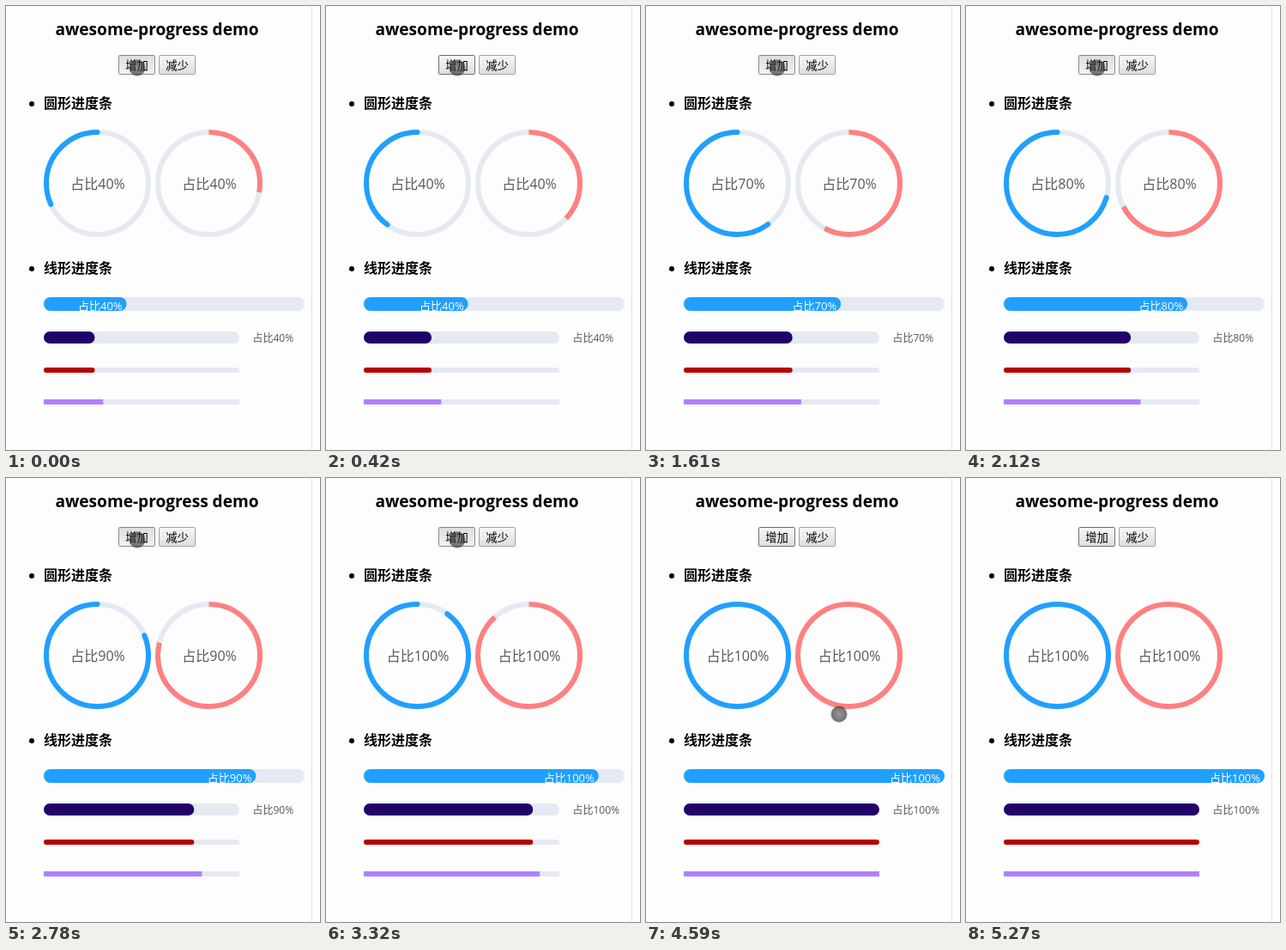
Write an HTML page that moves like this. It is 366 px wide and 517 px high and loops after 6.2 s.

```html
<!DOCTYPE html>
<html lang="zh">
<head>
<meta charset="utf-8">
<title>awesome-progress demo</title>
<style>
  html, body { margin: 0; width: 100%; height: 100%; overflow: hidden; background: #fff; }
  svg { display: block; width: 366px; height: 517px; }
  text { font-family: "Open Sans", "Noto Sans CJK SC", "Noto Sans CJK", sans-serif; }
  .title { font-size: 19.1px; font-weight: 700; text-anchor: middle; }
  .head { font-size: 16px; font-weight: 700; }
  .btn text { font-size: 13.33px; text-anchor: middle; }
  .btn rect { fill: url(#up); stroke: #a3a3a3; }
  .btn.focus rect { stroke: #707070; }
  .btn.down rect { fill: url(#down); stroke: #8c8c8c; }
  .ring path { fill: none; stroke-width: 6; stroke: #e4e9f2; }
  .ring text { font-size: 16px; fill: #55585e; text-anchor: middle; }
  .track { fill: #e4e9f2; }
  #inner { font-size: 13px; fill: #fff; text-anchor: end; }
  #side { font-size: 12px; fill: #55585e; }
</style>
</head>
<body>
<svg viewBox="0 0 366 517">
  <defs>
    <linearGradient id="up" x2="0" y2="1">
      <stop stop-color="#f6f6f6"/><stop offset="1" stop-color="#dddddd"/>
    </linearGradient>
    <linearGradient id="down" x2="0" y2="1">
      <stop stop-color="#dcdcdc"/><stop offset="1" stop-color="#f2f2f2"/>
    </linearGradient>
    <radialGradient id="touch">
      <stop stop-color="#333" stop-opacity=".5"/>
      <stop offset=".85" stop-color="#333" stop-opacity=".68"/>
      <stop offset="1" stop-color="#333" stop-opacity=".4"/>
    </radialGradient>
  </defs>

  <rect width="356" height="517" fill="#fdfdfd"/>
  <rect x="356" width="1" height="517" fill="#e2e2e2"/>

  <text class="title" x="176" y="34">awesome-progress demo</text>

  <g class="btn focus" id="add">
    <rect x="131.5" y="57.5" width="42" height="22" rx="1"/>
    <text x="152.5" y="74">增加</text>
  </g>
  <g class="btn">
    <rect x="178.5" y="57.5" width="42" height="22" rx="1"/>
    <text x="199.5" y="74">减少</text>
  </g>

  <circle cx="30" cy="114" r="3"/>
  <text class="head" x="44" y="119">圆形进度条</text>
  <circle cx="30" cy="306" r="3"/>
  <text class="head" x="44" y="311">线形进度条</text>

  <g class="ring">
    <path d="M106.5 147a59.5 59.5 0 0 0 0 119a59.5 59.5 0 0 0 0-119"/>
    <path id="blueRing" pathLength="100" d="M106.5 147a59.5 59.5 0 0 0 0 119a59.5 59.5 0 0 0 0-119"
      style="stroke:#20a0ff;stroke-linecap:round"/>
    <text class="pct" x="107" y="213"></text>
  </g>
  <g class="ring">
    <path d="M236.5 147a59.5 59.5 0 0 1 0 119a59.5 59.5 0 0 1 0-119"/>
    <path id="pinkRing" pathLength="100" d="M236.5 147a59.5 59.5 0 0 1 0 119a59.5 59.5 0 0 1 0-119"
      style="stroke:#ff8080"/>
    <text class="pct" x="237" y="213"></text>
  </g>

  <rect class="track" x="44" y="339" width="304" height="16" rx="8"/>
  <rect id="blueBar" x="44" y="339" height="16" rx="8" fill="#20a0ff"/>
  <text class="pct" id="inner" y="354"></text>

  <rect class="track" x="44" y="379" width="228" height="14" rx="7"/>
  <rect id="navyBar" x="44" y="379" height="14" rx="7" fill="#22006a"/>
  <text class="pct" id="side" x="287.5" y="391"></text>

  <rect class="track" x="44" y="421" width="228" height="6" rx="3"/>
  <rect id="redBar" x="44" y="421" height="6" rx="3" fill="#b60000"/>

  <rect class="track" x="44" y="458" width="228" height="6"/>
  <rect id="violetBar" x="44" y="458" height="6" fill="#b080ff"/>

  <circle id="cursor" r="9.7" fill="url(#touch)"/>
</svg>
<script>
const LOOP = 6200;
const $ = id => document.getElementById(id);

// Each tap adds 10 percent, starting with 40.
const taps = [-70, 530, 1045, 1590, 2090, 2720, 3315];
// Moments at which the screen refreshes.
const ticks = [0, 150, 270, 420, 540, 660, 780, 900, 1050, 1180, 1330, 1460, 1610, 1730,
  1880, 2000, 2120, 2240, 2390, 2510, 2660, 2780, 2900, 3020, 3170, 3320, 3440, 3590,
  3710, 3860, 3990, 4140, 4290, 4440, 4590, 4720, 4870, 4990, 5140, 5270];
// Pointer path: time, x, y
const path = [[4440, 153, 72], [4590, 225, 275], [4720, 278, 441],
  [4870, 294, 476], [4990, 302, 493], [5140, 309, 510], [5270, 314, 530]];

// cubic-bezier(.25, .1, .25, 1)
function ease(x) {
  if (x >= 1) return 1;
  const curve = (a, b, u) => 3 * a * u * (1 - u) ** 2 + 3 * b * u * u * (1 - u) + u ** 3;
  let lo = 0, hi = 1;
  for (let i = 0; i < 20; i++) {
    const mid = (lo + hi) / 2;
    if (curve(.25, .25, mid) < x) lo = mid; else hi = mid;
  }
  return curve(.1, 1, lo);
}

// Every tap restarts the transition from wherever the value is.
function progress(t, duration, start) {
  let value = start;
  taps.forEach((tap, i) => {
    if (t < tap) return;
    const end = Math.min(t, taps[i + 1] ?? t);
    value += (40 + 10 * i - value) * ease((end - tap) / duration);
  });
  return value;
}

function pointer(t) {
  if (t <= path[0][0]) return path[0].slice(1);
  const i = path.findIndex(p => p[0] >= t);
  if (i < 0) return path[path.length - 1].slice(1);
  const [a, b] = [path[i - 1], path[i]];
  const k = (t - a[0]) / (b[0] - a[0]);
  return [a[1] + (b[1] - a[1]) * k, a[2] + (b[2] - a[2]) * k];
}

const setRing = (id, p) => $(id).setAttribute("stroke-dasharray", p >= 99.95 ? "none" : p + " 200");
const setBar = (id, p, full) => $(id).setAttribute("width", p / 100 * full);
const labels = document.querySelectorAll(".pct");

function draw(t) {
  const done = taps.filter(tap => tap <= t);
  const blue = progress(t, 480, 30);
  const slow = progress(t, 1340, 25.6);

  setRing("blueRing", blue);
  setRing("pinkRing", progress(t, 1050, 27.2));
  setBar("blueBar", blue, 304);
  setBar("navyBar", slow, 228);
  setBar("redBar", slow, 228);
  setBar("violetBar", progress(t, 650, 29.2), 228);

  for (const label of labels) label.textContent = `占比${30 + 10 * done.length}%`;
  $("inner").setAttribute("x", 39 + blue * 3.04);
  $("add").classList.toggle("down", t - done[done.length - 1] < 100);

  const [x, y] = pointer(t);
  $("cursor").setAttribute("cx", x);
  $("cursor").setAttribute("cy", y);
}

function loop() {
  const t = performance.now() % LOOP;
  draw(ticks.filter(tick => tick <= t).pop());
  requestAnimationFrame(loop);
}
loop();
</script>
</body>
</html>
```
